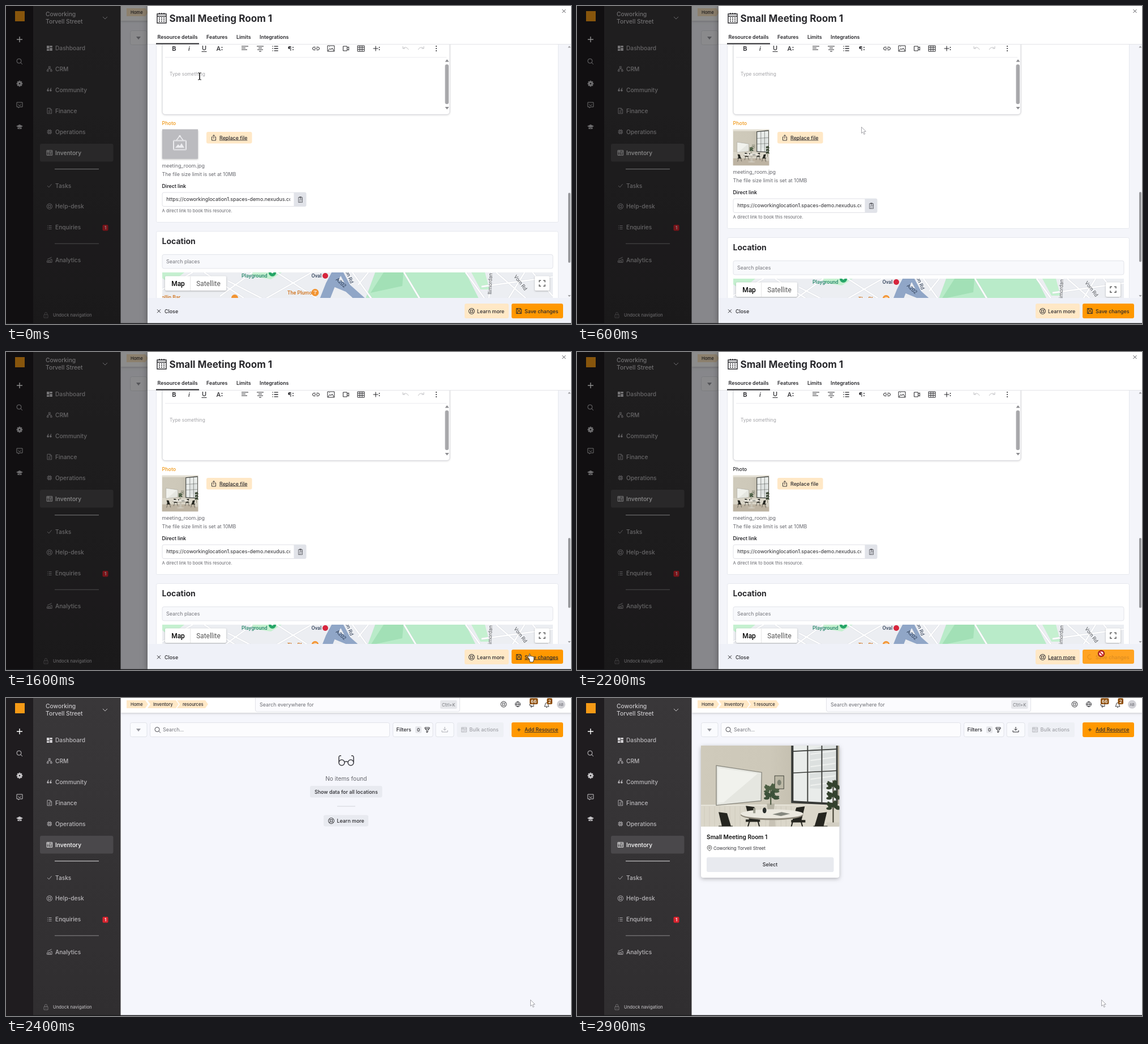
Recreate the animation shown at these times as an HTML page with a canvas. Size 998x561 px, loop 3000 ms.

```html
<!DOCTYPE html>
<html lang="en">
<head>
<meta charset="utf-8">
<title>Resource editor</title>
<style>
html, body { margin: 0; width: 100%; height: 100%; overflow: hidden; background: #f5f6fc; }
canvas { display: block; }
</style>
</head>
<body>
<canvas id="stage" width="998" height="561"></canvas>
<script>
const ctx = document.getElementById('stage').getContext('2d');
const INK = '#29292d', ORANGE = '#ff9800', CREAM = '#ffe8c6', BODY = 8.9;

// ---- helpers ----
function box(x, y, w, h, fill, r = 0, stroke) {
  ctx.beginPath();
  ctx.roundRect(x, y, w, h, r);
  if (fill) { ctx.fillStyle = fill; ctx.fill(); }
  if (stroke) { ctx.strokeStyle = stroke; ctx.lineWidth = 1; ctx.stroke(); }
}
function poly(points, fill, stroke, width = 1) {
  ctx.beginPath();
  for (let i = 0; i < points.length; i += 2) ctx.lineTo(points[i], points[i + 1]);
  if (fill) { ctx.closePath(); ctx.fillStyle = fill; ctx.fill(); }
  if (stroke) { ctx.strokeStyle = stroke; ctx.lineWidth = width; ctx.stroke(); }
}
function line(color, width, ...points) { poly(points, null, color, width); }
function disc(x, y, rx, fill, ry = rx) {
  ctx.beginPath();
  ctx.ellipse(x, y, rx, ry, 0, 0, 7);
  ctx.fillStyle = fill;
  ctx.fill();
}
function text(str, x, y, { size = BODY, weight = 400, color = INK, align = 'left', under = false, font = 'Inter' } = {}) {
  ctx.font = `${weight} ${size}px ${font}, sans-serif`;
  ctx.textAlign = align;
  ctx.fillStyle = color;
  ctx.fillText(str, x, y + size * 0.36);
  if (under) ctx.fillRect(x, y + 4.2, ctx.measureText(str).width, 0.8);
}
function placed(x, y, scale, draw, angle = 0) {
  ctx.save();
  ctx.translate(x, y);
  ctx.rotate(angle);
  ctx.scale(scale, scale);
  draw();
  ctx.restore();
}
function clipped(x, y, w, h, draw) {
  ctx.save();
  ctx.beginPath();
  ctx.rect(x, y, w, h);
  ctx.clip();
  draw();
  ctx.restore();
}
function shadowed(color, blur, dy, draw) {
  ctx.save();
  Object.assign(ctx, { shadowColor: color, shadowBlur: blur, shadowOffsetY: dy });
  draw();
  ctx.restore();
}

// Stroke icons centred on the origin
const ICONS = {
  plus: 'M-5 0H5M0-5V5',
  smallPlus: 'M-3 0H3M0-3V3',
  search: 'M3-1A4 4 0 1 1-5-1A4 4 0 1 1 3-1M2 2L5 5',
  chat: 'M-5-5H5V3H0L-2 5V3H-5ZM-2-2V-1M2-2V-1M-2 0Q0 2 2 0',
  people: 'M-1.5-4.5H1.5V-2H-1.5ZM-4.5 2H-2V4.5H-4.5ZM2 2H4.5V4.5H2ZM0-2V0M-3.2 2V0H3.2V2',
  page: 'M-4-5H1.5L4-2.5V5H-4ZM1-5V-2H4M-2 0H2M-2 2.5H2',
  chip: 'M-3-3H3V3H-3ZM-1.5-1.5H1.5V1.5H-1.5ZM-4.5-1.5H-3M-4.5 1.5H-3M3-1.5H4.5M3 1.5H4.5M-1.5-4.5V-3M1.5-4.5V-3M-1.5 3V4.5M1.5 3V4.5',
  table: 'M-5-4.5H5V4.5H-5ZM-5-2H5M-2-4.5V4.5M0 0H3.5M0 2.2H3.5',
  check: 'M-4 0L-1 3L4-3',
  ring: 'M5 0A5 5 0 1 1-5 0A5 5 0 1 1 5 0M2.2 0A2.2 2.2 0 1 1-2.2 0A2.2 2.2 0 1 1 2.2 0M-3.5-3.5L-1.6-1.6M3.5-3.5L1.6-1.6M-3.5 3.5L-1.6 1.6M3.5 3.5L1.6 1.6',
  list: 'M-4-3H-3M-1.5-3H4M-4 0H-3M-1.5 0H4M-4 3H-3M-1.5 3H4',
  chart: 'M-4.5 4.5V1.5H-1.5V4.5M-1.5 1H1.5V4.5M1.5-1H4.5V4.5H-4.5M-4-1L0-3L4-5',
  lock: 'M-3.5-1H3.5V4.5H-3.5ZM-2-1V-3A2 2 0 0 1 2-3V-1M0 1V2.5',
  down: 'M-4-2L0 2L4-2',
  close: 'M-3-3L3 3M3-3L-3 3',
  globe: 'M4.5 0A4.5 4.5 0 1 1-4.5 0A4.5 4.5 0 1 1 4.5 0M-4.5 0H4.5M0-4.5Q-4 0 0 4.5Q4 0 0-4.5',
  bell: 'M-4 3H4Q2.5 1 2.5-1A2.5 2.5 0 0 0-2.5-1Q-2.5 1-4 3M-1 4.5H1',
  horn: 'M-4-1L3-4V3L-4 1ZM-2 2V4H0V2',
  funnel: 'M-4-4H4V-2L1 1V4L-1 5V1L-4-2ZM-4-1.5H4',
  download: 'M0-5V1M-2.5-1.5L0 1L2.5-1.5M-5 1V4H5V1',
  upload: 'M0 2V-4.5M-2-2.5L0-4.5L2-2.5M-2-1H-3.5V5H3.5V-1H2',
  paste: 'M-3.5-4H3.5V5H-3.5ZM-1.5-5H1.5V-3H-1.5ZM-1-1H3.5M-1-1V5M1 1H2.5M1 3H2.5',
  save: 'M-4.5-4.5H3L4.5-3V4.5H-4.5ZM-2.5-4.5V-1.5H2.5V-4.5M-2.5 4.5V1H2.5V4.5',
  calendar: 'M-8-7H8V9H-8ZM-8-3H8M-4-9V-6M0-9V-6M4-9V-6M-5 0H-3M-1 0H1M3 0H5M-5 3H-3M-1 3H1M3 3H5M-5 6H-3M-1 6H1M3 6H5',
  glasses: 'M-13 3A5 5 0 1 0-3 3A5 5 0 1 0-13 3M3 3A5 5 0 1 0 13 3A5 5 0 1 0 3 3M-3 2Q0 0 3 2M-13 3V-6Q-13-10-9-9M13 3V-6Q13-10 9-9',
  pin: 'M0 4.5Q-4 1-4-1A4 4 0 0 1 4-1Q4 1 0 4.5M1.5-1A1.5 1.5 0 1 1-1.5-1A1.5 1.5 0 1 1 1.5-1',
  expand: 'M-5-2V-5H-2M2-5H5V-2M5 2V5H2M-2 5H-5V2',
  left: 'M-6-4H6M-6-1H1M-6 2H4',
  center: 'M-6-4H6M-3-1H3M-5 2H5M-2 5H2',
  link: 'M-1-2.5H-3.5A2.5 2.5 0 0 0-3.5 2.5H-1M1-2.5H3.5A2.5 2.5 0 0 1 3.5 2.5H1M-3 0H3',
  image: 'M-6-5H6V5H-6ZM-5 4L-2 0L0 2L2-1L5 4M-3-3H-2',
  video: 'M-5-4H2V4H-5ZM2-1L5-3V3L2 1',
  grid: 'M-6-5H6V5H-6ZM-6-2H6M-6 1.5H6M-2-5V5M2-5V5',
  undo: 'M-5 0Q1-5 5 2M-5-4V0H-1',
  redo: 'M5 0Q-1-5-5 2M5-4V0H1',
};
const paths = {};
function icon(name, x, y, color = INK, width = 1, scale = 1) {
  paths[name] ??= new Path2D(ICONS[name]);
  placed(x, y, scale, () => {
    ctx.strokeStyle = color;
    ctx.lineWidth = width;
    ctx.stroke(paths[name]);
  });
}
const triangle = (x, y, s, color) => poly([x - s, y - s * 0.6, x + s, y - s * 0.6, x, y + s * 0.7], color);

// ---- navigation ----
function navigation() {
  box(0, 0, 48, 561, '#1f1c1f');
  const shade = ctx.createLinearGradient(0, 0, 0, 561);
  shade.addColorStop(0, '#393739');
  shade.addColorStop(1, '#302e30');
  box(48, 0, 154.5, 561, shade);
  box(16, 9, 17, 18, '#f59a16');

  const soft = '#c6c4c7';
  icon('plus', 24, 59, '#fff', 1.4);
  icon('search', 24, 98, soft);
  for (let i = 0; i < 8; i++) placed(24, 137, 1, () => box(-1.2, -5.3, 2.4, 4, soft), i * Math.PI / 4);
  ctx.beginPath(); ctx.arc(24, 137, 2.8, 0, 7);
  ctx.strokeStyle = soft; ctx.lineWidth = 2.4; ctx.stroke();
  icon('chat', 24, 175, soft);
  poly([18, 212, 24, 209, 30, 212, 24, 215], soft);
  poly([20.5, 214, 24, 216, 27.5, 214, 27.5, 217, 20.5, 217], soft);

  const title = { size: 10.3, weight: 500, color: '#c9c7ca' };
  text('Coworking', 70, 14.5, title);
  text('Torvell Street', 70, 27, title);
  icon('down', 175, 21, soft);
  box(60, 243, 129.5, 31.5, '#4a484b', 3);

  const items = [['Dashboard', 74.5], ['CRM', 111, 'people'], ['Community', 148], ['Finance', 185, 'page'],
    ['Operations', 222, 'chip'], ['Inventory', 259, 'table'], ['Tasks', 317, 'check'],
    ['Help-desk', 353.5, 'ring'], ['Enquiries', 390.5, 'list'], ['Analytics', 448, 'chart']];
  for (const [label, y, name] of items) {
    const color = label === 'Inventory' ? '#fff' : '#bab8bb';
    text(label, 87, y, { size: 10.2, weight: 500, color });
    if (name) icon(name, 76.8, y, color, 0.9, 0.95);
  }
  for (const [x, y, h] of [[72, 70, 5], [77.3, 70, 3], [72, 76, 3], [77.3, 74, 5]]) box(x, y, 4.5, h, '#d5d3d6');
  for (const x of [72.5, 77.3]) { disc(x + 1.6, 149, 1.8, '#bab8bb'); line('#bab8bb', 1.1, x + 0.4, 149, x + 2.6, 144.5); }
  line('#e0dfe1', 1, 86, 287.7, 164, 287.7);
  line('#8b898c', 1, 86, 419.2, 164, 419.2);
  box(170.5, 386, 10, 10.5, '#d9232e', 2);
  text('1', 175.5, 391.2, { size: 7.5, weight: 600, color: '#fff', align: 'center' });
  icon('lock', 70.5, 545.5, '#767477', 0.9);
  text('Undock navigation', 83, 545.3, { size: 7.7, weight: 500, color: '#b5b3b6' });
}

// ---- meeting room picture, drawn on a 244 unit square ----
function plant(x, y, reach, color) {
  for (let i = 0; i < 15; i++) {
    const a = -3.1 + i * 0.22, r = reach * (0.75 + 0.25 * Math.sin(i * 5));
    placed(x, y, 1, () => disc(r * 0.65, 0, r * 0.36, color, 2.2), a);
  }
}
function chair(x, y, dir) {
  const c = '#25251f';
  poly([x - 12 * dir, y - 20, x + 3 * dir, y - 18, x + 10 * dir, y + 5, x - 6 * dir, y + 5], c);
  box(x - 12, y + 4, 25, 4, c);
  line(c, 2, x - 12 * dir, y + 30, x - 5 * dir, y + 5);
  line(c, 2, x + 15 * dir, y + 28, x + 9 * dir, y + 5);
}
function room() {
  const wall = ctx.createLinearGradient(0, 0, 244, 0);
  wall.addColorStop(0, '#cfcabb');
  wall.addColorStop(0.5, '#cdc8b9');
  wall.addColorStop(1, '#b5b0a0');
  box(0, 0, 244, 244, wall);
  box(0, 0, 244, 12, '#e5e1d6');
  poly([0, 156, 244, 154, 244, 197, 0, 197], '#dbd7ca');
  line('#eceae0', 1.5, 0, 156, 244, 155);
  for (let x = 6; x < 160; x += 9) line('#cbc6b8', 0.7, x, 158, x, 196);
  box(0, 195, 244, 49, '#bdb3a2');

  poly([159, 14, 241, 6, 241, 156, 159, 152], '#383a37');
  poly([163, 18, 238, 11, 238, 152, 163, 148], '#e9ecea');
  poly([192, 58, 238, 45, 238, 128, 192, 126], '#dce0df');
  for (let y = 66; y < 128; y += 11) line('#eff1ef', 2, 193, y, 237, y - 6);
  for (const x of [188, 213]) line('#3a3c39', 1.9, x, 14, x, 152);
  for (const y of [61, 99]) line('#3a3c39', 1.6, 162, y, 239, y - 4);

  poly([27, 86, 107, 98, 106, 148, 27, 156], '#e5e6e0', '#85847b', 1.3);
  poly([30, 90, 100, 100, 40, 151, 30, 152], '#f1f2ed');
  box(130, 104, 16, 23, '#bcb8a6', 0, '#44463d');
  disc(138, 116, 3.5, '#7d8273', 5);
  poly([116, 153, 130, 153, 128, 168, 118, 168], '#b7b4a5');
  line('#435039', 2, 123, 155, 123, 125);
  plant(123, 132, 16, '#4c5f44');
  plant(123, 144, 16, '#3d5139');
  line('#3c3a2c', 2, 233, 188, 233, 112);
  for (const y of [126, 144, 162]) plant(233, y, 16, '#34422e');
  poly([221, 186, 244, 186, 240, 213, 225, 213], '#d2cec2');

  chair(91, 177, 1);
  chair(171, 178, -1);
  poly([121, 175, 130, 175, 133, 218, 118, 218], '#c7c2b5');
  disc(125, 219, 24, '#d0cabd', 4);
  disc(125, 173, 55, '#8f897c', 9);
  disc(125, 171, 55, '#ebe8df', 8);
  box(92, 161, 4, 9, '#9c9c8e');
  disc(112, 165, 3.3, '#292d2b', 5);
  poly([126, 172, 142, 168, 157, 171, 141, 175], '#85877f');
  chair(43, 188, 1);
  chair(210, 188, -1);
}
function roomAt(x, y, w, h) {
  clipped(x, y, w, h, () => placed(x, y - (w - h) / 2, w / 244, room));
}

// ---- list page ----
function chevronTag(x, w, label, first) {
  const tip = x + w;
  poly([x, 4, tip - 5, 4, tip, 11, tip - 5, 18, x, 18, first ? x : x + 5, 11], CREAM);
  text(label, first ? x + 7 : x + 10, 11, { size: 7.7, weight: 500 });
}
function listPage(count, cardAlpha, hasPhoto, ready) {
  box(202.5, 0, 796, 561, '#f5f6fc');
  shadowed('#0003', 4, 1, () => box(202.5, -5, 796, 31, '#fff'));
  chevronTag(213, 38, 'Home', true);
  chevronTag(250, 55, 'Inventory');
  chevronTag(302, 55, count);
  box(440.5, -4, 361, 28, '#fbfbfe', 3, '#e2e3e8');
  text('Search everywhere for', 448, 11.5, { color: '#6c6d73' });
  box(767, 4, 29.5, 15, '#e6e7eb', 2);
  text('Ctrl+K', 781.7, 11.8, { size: 7.7, color: '#74757b', align: 'center' });
  icon('ring', 879, 11, INK, 0.9);
  icon('globe', 904, 11, INK, 0.9);
  icon('horn', 929, 12, INK, 0.9);
  icon('bell', 955, 12, INK, 0.9);
  box(925, 0.5, 14.5, 10.5, '#8c4b05', 2);
  box(955.5, 0.5, 9.5, 10.5, '#8c4b05', 2);
  const badge = { size: 8, weight: 600, color: '#fff', align: 'center' };
  text('66', 932.2, 6, badge);
  text('2', 960.3, 6, badge);
  disc(980.5, 11.3, 7.5, '#d1d1d6');
  text('AB', 980.5, 11.5, { size: 6.5, color: '#65656c', align: 'center' });

  const border = '#e1e3e9', panel = '#fafbfe';
  box(219.5, 43.5, 29.5, 25, panel, 3, border);
  triangle(234, 56.5, 4, '#9a9ba1');
  box(254.5, 43.5, 423, 25, '#fcfcfe', 3, border);
  icon('search', 268, 56.5, '#4a4a50');
  text('Search...', 277, 56, { color: '#73747a' });
  box(683.5, 43.5, 70.5, 25, panel, 3, border);
  text('Filters', 689.5, 56, { weight: 500 });
  box(723, 50, 11, 12, '#e6e7eb', 2);
  text('0', 728.5, 56.2, { size: 8, weight: 500, align: 'center' });
  icon('funnel', 744, 56);
  box(759, 43.5, 32, 25, panel, 3, border);
  icon('download', 775, 56, ready ? INK : '#abacb2');
  box(796.5, 43, 82.5, 26, '#eef0f5', 3);
  icon('table', 809, 56, '#aaabb1', 0.9, 0.9);
  text('Bulk actions', 818.5, 56, { weight: 500, color: '#a2a3a9' });
  box(893, 43, 91, 26, ORANGE, 3);
  icon('smallPlus', 906, 56);
  text('Add Resource', 916, 56, { weight: 500, under: true });

  if (cardAlpha) {
    ctx.save();
    ctx.globalAlpha = cardAlpha;
    card(hasPhoto);
    ctx.restore();
  } else emptyState();
}
function emptyState() {
  icon('glasses', 601, 111, '#3c3c42', 1.5);
  text('No items found', 600.8, 142.3, { size: 10.2, color: '#67686e', align: 'center' });
  box(537, 155, 127.5, 20.5, '#e8eaf0', 3);
  text('Show data for all locations', 600.8, 165.3, { weight: 500, align: 'center' });
  line('#d2d4da', 1, 585, 191, 617, 191);
  box(561, 206.5, 79, 20, '#e8eaf0', 3);
  icon('ring', 574.5, 216.7);
  text('Learn more', 584.5, 216.7, { weight: 500 });
}
function card(hasPhoto) {
  shadowed('#00000045', 7, 2, () => box(219, 84, 244.5, 233, '#fff', 4));
  box(219, 84, 244.5, 142.5, '#e9eaee', [4, 4, 0, 0]);
  if (hasPhoto) roomAt(219, 84, 244.5, 142.5);
  text('Small Meeting Room 1', 229, 245.5, { size: 10.2, weight: 600, color: '#111' });
  icon('pin', 234, 265.3, '#333', 0.8);
  text('Coworking Torvell Street', 241, 265, { size: 7.9, color: '#333338' });
  box(229, 281, 224.5, 26, '#e8eaef', 3);
  text('Select', 341, 294, { weight: 500, align: 'center' });
}

// ---- map ----
const roboto = { font: 'Roboto', weight: 500, size: 9 };
function tilted(label, x, y, degrees, color = '#54575c') {
  placed(x, y, 1, () => text(label, 0, 0, { font: 'Roboto', size: 9, color, align: 'center' }), degrees * Math.PI / 180);
}
function map() {
  box(276, 470, 690, 60, '#eceef2');
  poly([276, 470, 315, 470, 290, 490, 276, 480], '#c5f0d0');
  poly([430, 470, 487, 470, 468, 482, 440, 478], '#c5f0d0');
  poly([652, 470, 812, 470, 842, 530, 630, 530], '#b9ebc9');
  poly([667, 470, 702, 470, 700, 494, 644, 506], '#a2e0b6');
  poly([822, 470, 846, 470, 854, 500, 838, 500], '#c5f0d0');
  const roads = [[276, 500, 330, 470], [378, 512, 435, 470], [392, 485, 470, 525], [350, 470, 420, 515],
    [452, 520, 540, 470], [478, 470, 556, 520], [612, 470, 652, 525], [640, 470, 622, 492],
    [703, 470, 736, 525], [812, 470, 852, 525], [852, 525, 858, 470],
    [866, 470, 935, 530], [840, 495, 966, 478], [882, 525, 916, 470], [930, 470, 966, 512]];
  for (const r of roads) line('#d9dce3', 3.4, ...r);
  for (const r of roads) line('#fff', 2.4, ...r);
  line('#90a6c7', 17, 587, 466, 573, 492, 558, 530);
  line('#90a6c7', 14, 570, 484, 604, 498, 640, 530);
  line('#90a6c7', 7, 592, 470, 622, 526);
  tilted('A202', 592, 488, 43, '#27364e');
  tilted('on Rd', 607, 478, 68, '#27364e');
  tilted('llimordan', 855, 490, -88);
  tilted('Vorn Rd', 909, 488, 52);
  text('Playground', 416, 476, { ...roboto, color: '#27866b' });
  disc(470.5, 470.5, 6.5, '#26a567');
  disc(470.5, 469.5, 2, '#fff');
  text('Oval', 539.5, 476, { ...roboto, color: '#34445c' });
  disc(564, 476, 5, '#d7263d');
  text('The Plumo', 497, 506, { ...roboto, color: '#d0731d' });
  disc(546, 505.5, 6.5, '#f29432');
  line('#fff', 1, 543.5, 503, 548.5, 503, 546, 505.5, 546, 508.5);
  text('ollin Bar', 275, 514, { ...roboto, color: '#d0731d' });
  disc(404, 515, 6, '#f29432');
  shadowed('#0004', 3, 1, () => { box(281, 476.5, 108, 25.5, '#fff', 2); box(934, 476.5, 26, 25.5, '#fff', 2); });
  line('#e6e6e6', 1, 325.5, 477, 325.5, 502);
  text('Map', 304, 489.5, { font: 'Roboto', weight: 500, size: 11.9, color: '#000', align: 'center' });
  text('Satellite', 357.5, 489.5, { font: 'Roboto', size: 11.9, color: '#565656', align: 'center' });
  icon('expand', 947, 489.3, '#666', 1.6);
}

// ---- editing drawer ----
function toolbar() {
  const letter = { size: 11, weight: 500, align: 'center' };
  text('B', 297, 75, { ...letter, weight: 600 });
  text('i', 323.5, 75, { ...letter, weight: 'italic 500' });
  text('U', 350, 74.5, letter);
  line(INK, 1, 345.5, 80.5, 354.5, 80.5);
  text('A', 375.5, 75, letter);
  text('¶', 501, 75, letter);
  for (const [name, x] of [['left', 422], ['center', 449], ['list', 475.5], ['link', 547.5], ['image', 574], ['video', 600.5], ['grid', 627]])
    icon(name, x, 75, INK, 1, name === 'list' ? 1.3 : 1);
  icon('plus', 653, 75, INK, 1.2, 0.9);
  icon('undo', 706, 75, '#c3c3c6');
  icon('redo', 733, 75, '#c3c3c6');
  for (const x of [381.5, 507, 659.5]) for (const y of [73, 77]) disc(x, y, 0.9, INK);
  for (const y of [71, 75, 79]) disc(760, y, 1, INK);
}
function photoPlaceholder() {
  shadowed('#0004', 3, 1, () => box(276, 217.5, 63, 52, '#bbbbbf'));
  const w = '#ececef';
  line(w, 1.5, 301, 237, 307, 229, 313, 237);
  disc(307, 229.5, 1.7, w);
  box(295.5, 237, 23, 17, null, 1, w);
  box(296.5, 238, 21, 15, null, 1, w);
  poly([299, 250, 304, 244, 307, 247, 310, 242, 315, 250], w);
}
function drawerContent({ loaded, saving }) {
  box(250, 68, 748, 448, '#f4f5fa');
  box(265.5, 40, 710, 341.5 + (loaded ? 11 : 0), '#fff', 2, '#e6e8ee');
  shadowed('#00000018', 3, 1, () => box(276, 40, 508, 151.5, '#fff', 5, '#d9dade'));
  toolbar();
  line('#ececef', 1, 281, 90.5, 778, 90.5);
  text('Type something', 289, 119.8, { size: 8.3, color: '#a3a3a7' });
  triangle(779, 180, 3.5, '#8c8c90');
  triangle(779, 96.5, -3.5, '#8c8c90');
  box(775.5, 103, 6.5, 70, '#a8a8ab', 3);
  text('Photo', 275.5, 207, { weight: 500, color: saving ? INK : '#f09a1c' });
  box(354, 222, 80.5, 20.5, CREAM, 3);
  icon('upload', 367, 232, INK, 0.9);
  text('Replace file', 377, 232.3, { weight: 500, under: !saving });
  if (loaded) roomAt(275.5, 217.5, 64, 64); else photoPlaceholder();

  ctx.save();
  ctx.translate(0, loaded ? 11 : 0);
  text('meeting_room.jpg', 275.5, 281.3, { color: '#66676d' });
  text('The file size limit is set at 10MB', 275.5, 296.5, { color: '#66676d' });
  text('Direct link', 275.5, 317.7, { weight: 600, size: 8.8 });
  box(276, 329, 233, 24.5, '#fff', [3, 0, 0, 3], '#e0e1e6');
  clipped(283, 330, 219, 23, () => text('https://coworkinglocation1.spaces-demo.nexudus.com', 283.3, 341.2));
  box(509, 328.5, 21.5, 25.5, '#e1e3e9', [0, 3, 3, 0]);
  icon('paste', 520, 341.5, '#55565c', 0.8);
  text('A direct link to book this resource.', 275.5, 361.3, { size: 7.7, color: '#66676d' });
  box(265.5, 397.5, 710, 180, '#fff', 3, '#e6e8ee');
  text('Location', 275.5, 415.3, { size: 14, weight: 700 });
  box(276, 438.5, 690, 24.5, '#f8f9fc', 3, '#e2e4ea');
  text('Search places', 283, 451, { color: '#74757b' });
  clipped(276, 470, 690, 60, map);
  ctx.restore();

  triangle(995, 72, -2.5, '#9b9b9f');
  triangle(995, 511.5, 2.5, '#9b9b9f');
  box(993, loaded ? 328 : 329.5, 4, 123.5, '#97989c', 2);
}
function drawer(state) {
  box(0, 0, 998, 561, '#00000073');
  shadowed('#0006', 10, 0, () => box(250, 0, 760, 561, '#fff'));
  clipped(250, 68, 748, 448, () => drawerContent(state));
  icon('calendar', 275, 21, INK, 1.4);
  text('Small Meeting Room 1', 288.5, 22, { size: 17.1, weight: 700 });
  icon('close', 985.5, 9, '#55565b');
  for (const [label, x] of [['Resource details', 267.5], ['Features', 354], ['Limits', 407], ['Integrations', 448]])
    text(label, x, 55, { weight: 600 });
  line('#e3e4e8', 1, 250, 67.5, 998, 67.5);
  box(265, 65.5, 76, 2, INK);

  box(250, 515, 748, 46, '#eff1f8');
  icon('close', 270, 538.3);
  text('Close', 280, 538.3, { weight: 500 });
  box(810, 525, 78, 26, CREAM, 3);
  icon('ring', 822.5, 538.3);
  text('Learn more', 832, 538.3, { weight: 500, under: state.saving });
  box(893, 525, 91, state.pressed ? 25 : 26, state.saving ? '#ffa322' : ORANGE, 3);
  if (state.saving) {
    ctx.beginPath(); ctx.arc(906, 538, 4, 0.8, 5);
    ctx.strokeStyle = '#e28d18'; ctx.lineWidth = 1; ctx.stroke();
    text('Save changes', 916, 538.3, { weight: 500, color: '#db8c23' });
  } else {
    icon('save', 906, 538);
    text('Save changes', 916, 538.3, { weight: 500, under: state.hover });
  }
}

// ---- pointers ----
const pointers = {
  beam() {
    for (const [color, w] of [['#fff', 2.6], ['#222', 1.2]]) {
      line(color, w, -3, -6, -1, -6, 0, -5, 0, 5, -1, 6, -3, 6);
      line(color, w, 3, -6, 1, -6, 0, -5, 0, 5, 1, 6, 3, 6);
    }
  },
  arrow() {
    const shape = [0, 0, 0, 11, 2.5, 8.8, 4.4, 13, 6.2, 12.2, 4.4, 8, 7.8, 7.8, 0, 0];
    poly(shape, '#fff', '#8f8f95', 0.8);
  },
  hand() {
    const shape = new Path2D('M-1 8L-4 4Q-5 2-3 2L-1.5 3.5V-1Q-1-2.5 .3-1V2.5Q1.5 1.5 2.5 3Q4 2 4.8 3.5Q6.5 3 7 4.5V8Q6.5 10 5.5 13H0Z');
    ctx.fillStyle = '#fff'; ctx.fill(shape);
    ctx.strokeStyle = '#3b3325'; ctx.lineWidth = 0.9; ctx.stroke(shape);
  },
  blocked() {
    disc(0, 0, 6, '#5b1010');
    disc(0, 0, 5.3, '#d32a2a');
    disc(0, 0, 3.5, '#fff');
    line('#d32a2a', 1.9, -3, -3, 3, 3);
  },
};
const mix = (a, b, k) => a + (b - a) * k;
function pointerPosition(t) {
  if (t <= 600) {
    const k = Math.max(0, (t - 100) / 500) ** 3;
    return [mix(342, 502.5, k), mix(124, 213.5, k)];
  }
  if (t <= 1200) {
    const k = 1 - (1 - (t - 600) / 600) ** 2;
    return [mix(502.5, 922, k), mix(213.5, 534, k)];
  }
  return [mix(922, 925.5, Math.min(1, (t - 1200) / 400)), 534];
}

// The picture holds still at the start and while the button is pressed.
function stepTime(t) {
  if (t < 200) return 0;
  if (t >= 1600 && t < 2200) return 1600;
  return Math.floor(t / 100) * 100;
}
function scene(t) {
  const listOpen = t >= 2400;
  const cardAlpha = t < 2600 ? 0 : Math.min(1, (t - 2500) / 200);
  listPage(t < 2600 ? 'resources' : '1 resource', cardAlpha, t >= 2700, t >= 2800);
  navigation();
  const saving = t >= 2200;
  let [x, y] = pointerPosition(t);
  const hover = x > 893 && y > 525;
  if (!listOpen) drawer({ loaded: t >= 400, saving, hover, pressed: t >= 1500 });
  let kind = y < 190 && x < 784 ? 'beam' : hover ? 'hand' : 'arrow';
  if (listOpen) { kind = 'arrow'; x = 926.5; y = 532.5; }
  else if (saving) { kind = 'blocked'; x = 926; y = 532; }
  box(0, 559.5, 998, 1.5, '#1c1c1f');
  placed(x, y, 1, pointers[kind]);
}
function tick() {
  const t = stepTime(performance.now() % 3000);
  ctx.clearRect(0, 0, 998, 561);
  scene(t);
  requestAnimationFrame(tick);
}
requestAnimationFrame(tick);
</script>
</body>
</html>
```
